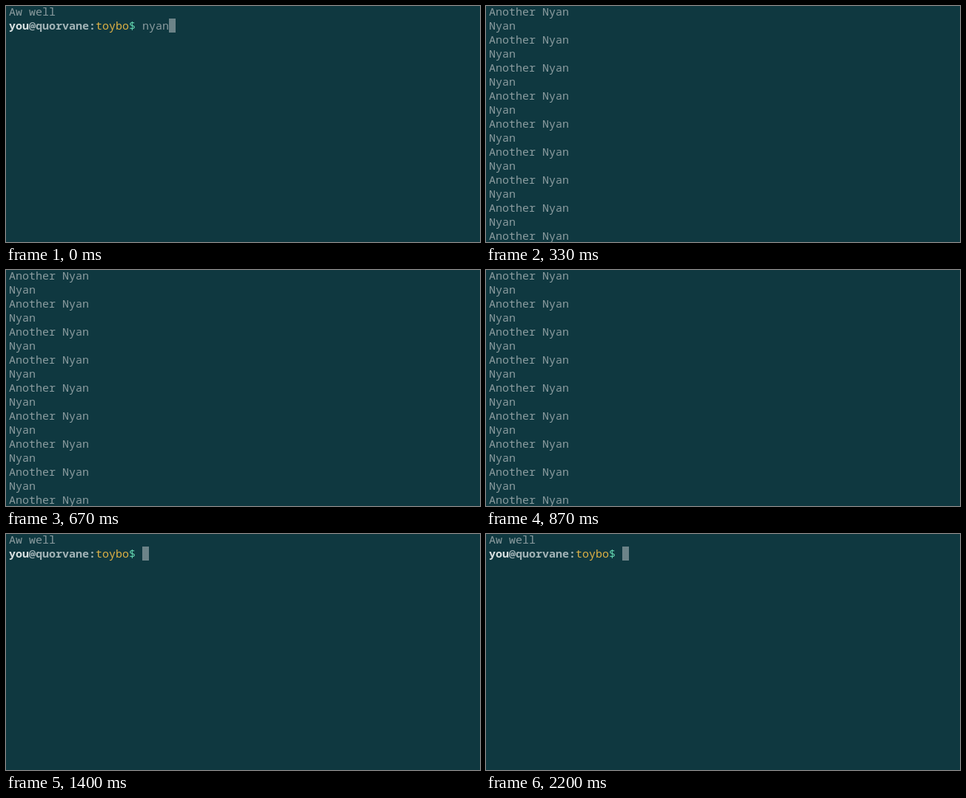
An HTML page with a canvas for the animation above (2390 ms loop, 640 by 320 pixels).

```html
<!DOCTYPE html>
<html lang="en">
<head>
<meta charset="utf-8">
<title>Terminal loop</title>
<style>
  html, body { margin: 0; width: 100%; height: 100%; overflow: hidden; background: #0f3840; }
  canvas { display: block; width: 640px; height: 320px; }
</style>
</head>
<body>
<canvas id="stage" width="640" height="320"></canvas>
<script>
const ctx = document.getElementById('stage').getContext('2d', { alpha: false });

const LOOP = 2390;
const LEFT = 4, CELL = 9, ROW = 19, BASELINE = 13;
const FONT = '15px "Noto Sans Mono", monospace';
const COLORS = {
  back: '#0f3840', text: '#8b9c9f', user: '#d9e1e1', host: '#a3b4b7',
  folder: '#deb144', sign: '#62d6b0', cursor: '#6c8388'
};

const ENTER = 70, STOP = 1400;
const SCROLLS = [140, 200, 270, 330, 470, 530, 600, 670, 800, 870, 1130, 1200, 1270, 1330];
const FADE_START = 1670, FADE_END = 2000, FADE_STEPS = 5, CURSOR_BACK = 2200;

const PROMPT = [
  ['you', COLORS.user, 'bold '],
  ['@quorvane:', COLORS.host, 'bold '],
  ['toybo', COLORS.folder, ''],
  ['$', COLORS.sign, '']
];

function write(text, col, row, color = COLORS.text, weight = '') {
  ctx.font = weight + FONT;
  ctx.fillStyle = color;
  ctx.fillText(text, LEFT + col * CELL, BASELINE + row * ROW);
}

function drawCursor(col, row, alpha = 1) {
  ctx.globalAlpha = alpha;
  ctx.fillStyle = COLORS.cursor;
  ctx.fillRect(LEFT + col * CELL, row * ROW - 2, CELL, ROW);
  ctx.globalAlpha = 1;
}

// Draws the prompt line and returns the column where typing begins.
function drawPrompt() {
  write('Aw well', 0, 0);
  let col = 0;
  for (const [text, color, weight] of PROMPT) {
    write(text, col, 1, color, weight);
    col += text.length;
  }
  return col + 1;
}

function drawOutput(scrolls) {
  for (let row = 0; row < 17; row++) {
    write((row + scrolls) % 2 ? 'Nyan' : 'Another Nyan', 0, row);
  }
}

function cursorAlpha(t) {
  if (t < FADE_START || t >= CURSOR_BACK) return 1;
  const stepTime = (FADE_END - FADE_START) / (FADE_STEPS - 1);
  const step = Math.floor((t - FADE_START) / stepTime) + 1;
  return Math.max(0, 1 - step / FADE_STEPS);
}

function draw(t) {
  ctx.fillStyle = COLORS.back;
  ctx.fillRect(0, 0, 640, 320);

  if (t >= SCROLLS[0] && t < STOP) {
    drawOutput(SCROLLS.filter(time => time <= t).length);
    return;
  }

  const col = drawPrompt();
  if (t >= STOP) {
    drawCursor(col, 1, cursorAlpha(t));
    return;
  }
  write('nyan', col, 1);
  if (t < ENTER) drawCursor(col + 4, 1);
  else drawCursor(0, 2);
}

const start = performance.now();
function tick() {
  draw((performance.now() - start) % LOOP);
  requestAnimationFrame(tick);
}
tick();
</script>
</body>
</html>
```
